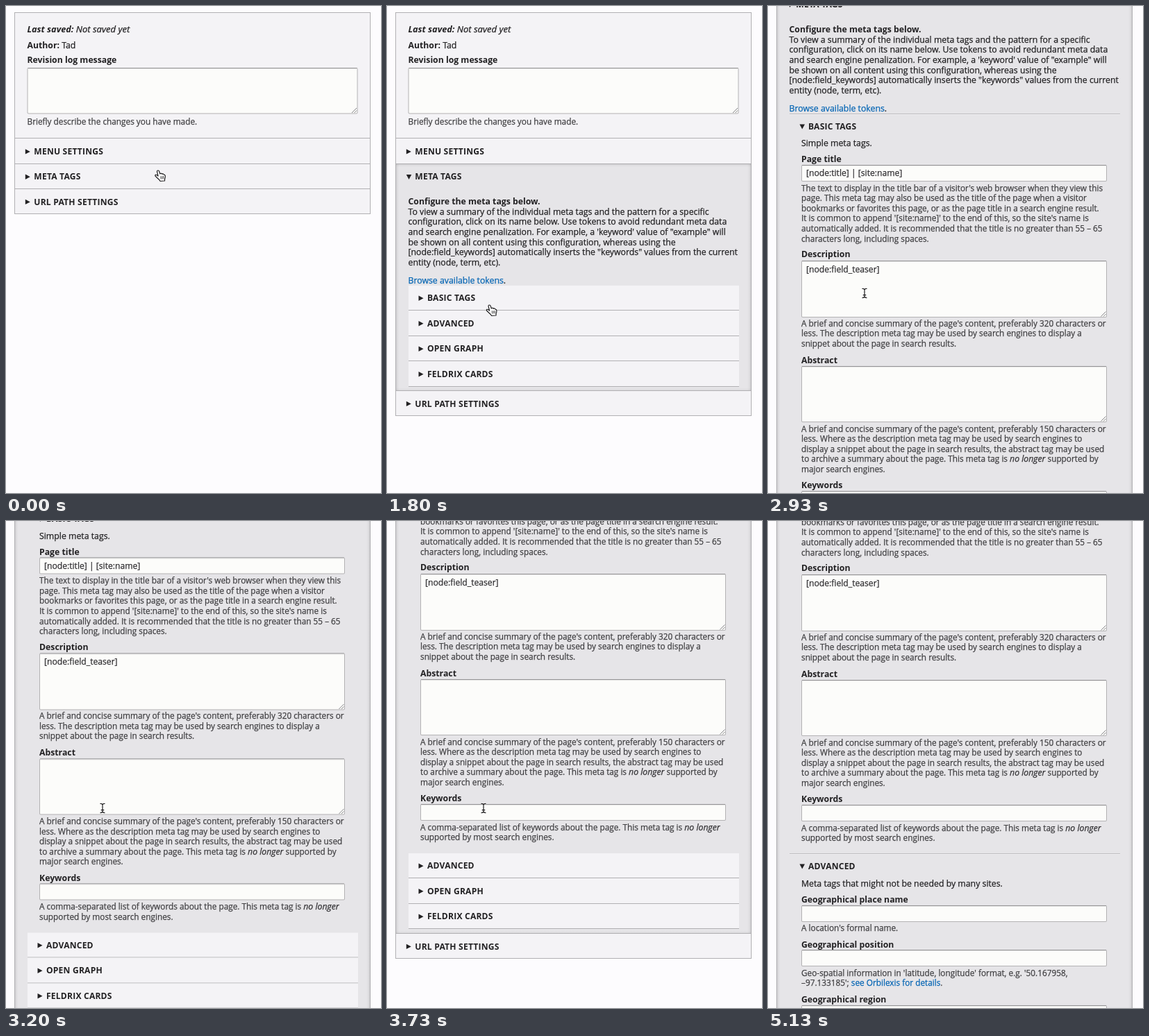
An HTML page with a canvas that plays this animation: 540 px wide and 702 px high, repeating every 5.19 s.

```html
<!DOCTYPE html>
<html lang="en">
<head>
<meta charset="utf-8">
<title>Meta tag settings</title>
<style>
  html, body { margin: 0; width: 100%; height: 100%; overflow: hidden; background: #fdfcfe; }
  canvas { display: block; width: 540px; height: 702px; }
</style>
</head>
<body>
<canvas id="stage"></canvas>
<script>
const W = 540, H = 702, LOOP = 5190, STEP = 200 / 3;
const canvas = document.getElementById('stage');
const dpr = window.devicePixelRatio || 1;
canvas.width = W * dpr;
canvas.height = H * dpr;
const ctx = canvas.getContext('2d');

const PAGE = '#fdfcfe', PANEL = '#f4f3f6', OPEN = '#e6e5e8', LINE = '#b1b0b3';
const FAMILY = '"Open Sans", "Noto Sans", sans-serif';
const styles = {
  body: ['400 12.3px', '#222123'],
  label: ['700 12.25px', '#222123'],
  heading: ['700 12.1px', '#222123', '0.2px'],
  strongEm: ['italic 700 12.7px', '#222123'],
  em: ['italic 400 13.1px', '#222123'],
  help: ['400 11.8px', '#414043'],
  helpEm: ['italic 400 12.3px', '#343336'],
  field: ['400 12.15px', '#302f32'],
  link: ['400 12.3px', '#0465b4'],
  helpLink: ['400 11.8px', '#0465b4']
};

// Moments when each section opens
const OPEN_META = 667, OPEN_BASIC = 2267, OPEN_ADVANCED = 4600;

const scrollKeys = [
  [2533, 0], [2600, 40.5], [2800, 160], [3000, 292], [3200, 424.5], [3267, 474],
  [3333, 508], [3400, 526], [3533, 538], [3733, 539], [3867, 539], [3933, 538]
];
const cursorKeys = [
  [200, 219.5, 237], [467, 157.5, 245], [1200, 157.5, 245], [1667, 148, 431],
  [1800, 148, 431], [2133, 139, 414], [3867, 139, 414], [4267, 125, 496],
  [4667, 125, 496], [4933, 150, 725]
];

function track(keys, t, ease = u => u) {
  if (t <= keys[0][0]) return keys[0].slice(1);
  for (let i = 1; i < keys.length; i++) {
    const a = keys[i - 1], b = keys[i];
    if (t <= b[0]) {
      const u = ease((t - a[0]) / (b[0] - a[0]));
      return a.slice(1).map((v, j) => v + (b[j + 1] - v) * u);
    }
  }
  return keys[keys.length - 1].slice(1);
}
const smooth = u => u * u * (3 - 2 * u);

function rect(x, y, w, h, color) {
  ctx.fillStyle = color;
  ctx.fillRect(x, y, w, h);
}

// Text is placed by the middle of its capitals; returns the end of the run.
// A hairline stroke gives regular weights a slightly fuller look.
function text(str, x, y, name) {
  const [font, color, spacing] = styles[name];
  ctx.font = font + ' ' + FAMILY;
  ctx.letterSpacing = spacing || '0px';
  ctx.fillStyle = ctx.strokeStyle = color;
  ctx.fillText(str, x, y + 4.3);
  if (font.includes('400')) {
    ctx.lineWidth = 0.25;
    ctx.lineJoin = 'round';
    ctx.strokeText(str, x, y + 4.3);
  }
  return x + ctx.measureText(str).width;
}

function runs(parts, x, y) {
  for (const [str, name] of parts) x = text(str, x, y, name);
}

function lines(list, x, y, name) {
  list.forEach((item, i) => {
    const ly = y + i * 14.55;
    if (Array.isArray(item)) runs(item, x, ly);
    else text(item, x, ly, name);
  });
}

function heading(str, x, y, open) {
  ctx.fillStyle = '#222123';
  ctx.beginPath();
  if (open) {
    ctx.moveTo(x, y - 3);
    ctx.lineTo(x + 7.5, y - 3);
    ctx.lineTo(x + 3.75, y + 4);
  } else {
    ctx.moveTo(x, y - 3.5);
    ctx.lineTo(x + 7, y + 0.2);
    ctx.lineTo(x, y + 3.9);
  }
  ctx.fill();
  text(str, x + 12.5, y, 'heading');
}

function field(x, y, w, h, grip) {
  ctx.beginPath();
  ctx.roundRect(x, y, w, h, 2);
  ctx.fillStyle = '#b3b2b4';
  ctx.fill();
  ctx.beginPath();
  ctx.roundRect(x + 1, y + 1, w - 2, h - 2, 1);
  ctx.fillStyle = '#fcfcfa';
  ctx.fill();
  rect(x + 1, y, w - 2, 1, '#949395');
  rect(x + 1, y + 1, w - 2, 1, '#e6e6e5');
  if (!grip) return;
  ctx.strokeStyle = '#77767a';
  ctx.lineWidth = 0.9;
  ctx.beginPath();
  for (const d of [7, 3.5]) {
    ctx.moveTo(x + w - 1.5 - d, y + h - 1.5);
    ctx.lineTo(x + w - 1.5, y + h - 1.5 - d);
  }
  ctx.stroke();
}

function shade(x, y, w, h, x0, y0, x1, y1, alpha) {
  const g = ctx.createLinearGradient(x0, y0, x1, y1);
  g.addColorStop(0, `rgba(0,0,0,${alpha})`);
  g.addColorStop(0.5, `rgba(0,0,0,${alpha * 0.3})`);
  g.addColorStop(1, 'rgba(0,0,0,0)');
  rect(x, y, w, h, g);
}

function openSection(top, bottom) {
  const h = bottom - top;
  rect(13, top, 511, h, OPEN);
  shade(13, top, 511, 5, 0, top, 0, top + 5, 0.15);
  shade(13, top, 5, h, 13, 0, 18, 0, 0.1);
  shade(519, top, 5, h, 524, 0, 519, 0, 0.1);
  shade(13, bottom - 4, 511, 4, 0, bottom, 0, bottom - 4, 0.05);
}

function closedRows(names, top) {
  names.forEach((name, i) => {
    const edge = top + i * 36.5;
    const y = Math.round(edge), end = Math.round(edge + 36.5);
    rect(31, y, 476, end - y, PANEL);
    rect(31, end - 1, 476, 1, LINE);
    heading(name, 45.5, edge + 18.6, false);
  });
}

function openRow(name, top) {
  rect(31, top, 476, 1, '#bebdc0');
  rect(31, top + 1, 476, 1, '#efeef1');
  heading(name, 45.5, top + 18.4, true);
}

function basicTags() {
  const x = 48;
  openRow('BASIC TAGS', 403);
  text('Simple meta tags.', x, 446, 'body');

  text('Page title', x, 469, 'label');
  field(x, 477, 440, 24);
  text('[node:title] | [site:name]', 55, 489, 'field');
  lines([
    "The text to display in the title bar of a visitor's web browser when they view this",
    'page. This meta tag may also be used as the title of the page when a visitor',
    'bookmarks or favorites this page, or as the page title in a search engine result.',
    "It is common to append '[site:name]' to the end of this, so the site's name is",
    'automatically added. It is recommended that the title is no greater than 55 – 65',
    'characters long, including spaces.'
  ], x, 510.5, 'help');

  text('Description', x, 606, 'label');
  field(x, 615, 440, 82, true);
  text('[node:field_teaser]', 55, 627.5, 'field');
  lines([
    "A brief and concise summary of the page's content, preferably 320 characters or",
    'less. The description meta tag may be used by search engines to display a',
    'snippet about the page in search results.'
  ], x, 705.5, 'help');

  text('Abstract', x, 758.5, 'label');
  field(x, 767, 440, 81, true);
  lines([
    "A brief and concise summary of the page's content, preferably 150 characters or",
    'less. Where as the description meta tag may be used by search engines to',
    'display a snippet about the page in search results, the abstract tag may be used',
    [['to archive a summary about the page. This meta tag is ', 'help'],
      ['no longer', 'helpEm'], [' supported by', 'help']],
    'major search engines.'
  ], x, 857.2, 'help');

  text('Keywords', x, 939, 'label');
  field(x, 947, 440, 24);
  lines([
    [['A comma-separated list of keywords about the page. This meta tag is ', 'help'],
      ['no longer', 'helpEm']],
    'supported by most search engines.'
  ], x, 980.3, 'help');
}

function advancedTags() {
  const x = 48;
  openRow('ADVANCED', 1017);
  text('Meta tags that might not be needed by many sites.', x, 1060.5, 'body');

  text('Geographical place name', x, 1084, 'label');
  field(x, 1092, 440, 24);
  text("A location's formal name.", x, 1124.5, 'help');

  text('Geographical position', x, 1148.5, 'label');
  field(x, 1156, 440, 24);
  lines([
    "Geo-spatial information in 'latitude, longitude' format, e.g. '50.167958,",
    [["–97.133185'; ", 'help'], ['see Orbilexis for details', 'helpLink'], ['.', 'help']]
  ], x, 1189.5, 'help');

  text('Geographical region', x, 1227.5, 'label');
  field(x, 1236, 440, 24);
}

function metaTags(basic, advanced) {
  lines([
    [['Configure the meta tags below.', 'label']],
    'To view a summary of the individual meta tags and the pattern for a specific',
    'configuration, click on its name below. Use tokens to avoid redundant meta data',
    'and search engine penalization. For example, a \'keyword\' value of "example" will',
    'be shown on all content using this configuration, whereas using the',
    '[node:field_keywords] automatically inserts the "keywords" values from the current',
    'entity (node, term, etc).'
  ], 30.5, 282, 'body');
  runs([['Browse available tokens', 'link'], ['.', 'body']], 30.5, 395.5);

  const rest = ['OPEN GRAPH', 'FELDRIX CARDS'];
  if (!basic) {
    closedRows(['BASIC TAGS', 'ADVANCED', ...rest], 402.5);
    return;
  }
  basicTags();
  if (advanced) advancedTags();
  else closedRows(['ADVANCED', ...rest], 1017.5);
}

function form(t) {
  const meta = t >= OPEN_META, basic = t >= OPEN_BASIC, advanced = t >= OPEN_ADVANCED;
  const end = advanced ? 2000 : basic ? 1133 : meta ? 554 : 263;

  rect(12, 9, 513, end + 28, LINE);
  rect(13, 10, 511, end + 26, PANEL);

  runs([['Last saved:', 'strongEm'], [' Not saved yet', 'em']], 30.5, 33.5);
  runs([['Author:', 'label'], [' Tad', 'body']], 30.5, 56.3);
  text('Revision log message', 30.5, 78, 'label');
  field(30.5, 89, 476, 66.5, true);
  text('Briefly describe the changes you have made.', 30.5, 166.5, 'help');

  rect(13, 190, 511, 1, LINE);
  heading('MENU SETTINGS', 27.8, 209.7, false);
  if (meta) openSection(227, end);
  rect(13, 227, 511, 1, LINE);
  heading('META TAGS', 27.8, 246, meta);
  if (meta) metaTags(basic, advanced);
  rect(13, end, 511, 1, LINE);
  heading('URL PATH SETTINGS', 27.8, end + 19.2, false);
}

const hand = new Path2D('M-2 1.6Q-2 0-.6 0Q.8 0 1.2 1.5L2.3 5Q3 4 4.3 4.3Q5.2 4.5 5.4 5.3' +
  'Q6.4 4.6 7.3 5.2Q8 5.6 8.2 6.4Q9.6 6.2 9.8 7.9Q10.1 10.5 9 13L9 15L2.6 15.5' +
  'Q1 13-1.5 11L-4.3 8.3Q-5.2 7-4 6.3Q-2.6 6-.5 8Z');
const handLines = new Path2D('M3.2 8.8L3.7 12.2M5.2 8.6L5.7 12M7.2 8.4L7.5 11.8');
const beam = new Path2D('M-3-6.6Q-.4-6.6 0-5Q.4-6.6 3-6.6M0-5V5M-3 6.6Q-.4 6.6 0 5Q.4 6.6 3 6.6M-1.8 2.6H1.8');

function overText(t, y) {
  if (t < OPEN_META) return false;
  if (t < OPEN_BASIC) return y > 272 && y < 386;
  if (t < OPEN_ADVANCED) return t >= 2533 && y < 479;
  return y > 515;
}

function pointer(t) {
  const [x, y] = track(cursorKeys, t, smooth);
  ctx.save();
  ctx.translate(x, y);
  ctx.lineJoin = ctx.lineCap = 'round';
  if (overText(t, y)) {
    ctx.strokeStyle = 'rgba(255,255,255,.5)';
    ctx.lineWidth = 2.4;
    ctx.stroke(beam);
    ctx.strokeStyle = '#1c1b1d';
    ctx.lineWidth = 1.2;
    ctx.stroke(beam);
  } else {
    ctx.fillStyle = '#fff';
    ctx.fill(hand);
    ctx.strokeStyle = '#1c1b1d';
    ctx.lineWidth = 1.2;
    ctx.stroke(hand);
    ctx.lineWidth = 0.8;
    ctx.stroke(handLines);
  }
  ctx.restore();
}

function draw(now) {
  // Fifteen pictures a second, like a screen recording
  const t = Math.floor((now % LOOP + 5) / STEP) * STEP;
  const scroll = Math.round(track(scrollKeys, t)[0] * 2) / 2;
  ctx.setTransform(dpr, 0, 0, dpr, 0, 0);
  rect(0, 0, W, H, PAGE);
  ctx.save();
  ctx.translate(0, -scroll);
  form(t);
  ctx.restore();
  pointer(t);
}

const start = performance.now();
function tick() {
  draw(performance.now() - start);
  requestAnimationFrame(tick);
}
tick();
</script>
</body>
</html>
```
